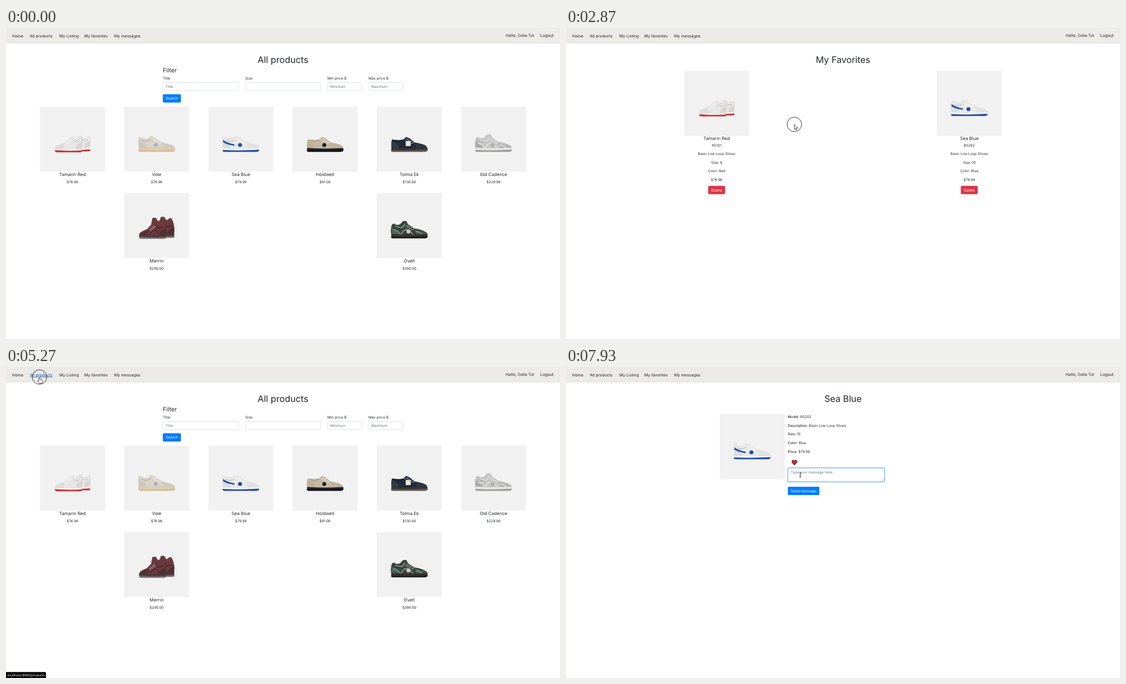
Write an HTML page that moves like this. It is 998 by 561 pixels and loops after 8000 ms.

```html
<!DOCTYPE html>
<html lang="en">
<head>
<meta charset="utf-8">
<title>Shoe shop</title>
<style>
html, body { margin: 0; height: 100%; overflow: hidden; background: #fff; }
svg { display: block; width: 100vw; height: 100vh; font-family: Inter, "Open Sans", sans-serif; }
text { fill: #212529; text-rendering: geometricPrecision; white-space: pre; }
</style>
</head>
<body>
<svg id="stage" viewBox="0 0 998 561" preserveAspectRatio="none"></svg>
<script>
const stage = document.getElementById('stage');

const text = (x, y, size, str, more = '') =>
  `<text x="${x}" y="${y}" font-size="${size}" ${more}>${str}</text>`;
const mid = (x, y, size, str, more = '') => text(x, y, size, str, 'text-anchor="middle" ' + more);
const box = (x, y, w, h, fill, more = '') =>
  `<rect x="${x}" y="${y}" width="${w}" height="${h}" fill="${fill}" ${more}/>`;
const path = (d, fill, more = '') => `<path d="${d}" fill="${fill}" ${more}/>`;
const button = (x, y, w, label, fill, size = 6.6) =>
  box(x, y, w, 15, fill, 'rx="1.8"') + mid(x + w / 2, y + 9.8, size, label, 'style="fill:#fff"');
const title = str => mid(499, 62.5, 16.2, str);

// Shoe outlines in a 117 x 117 tile, toe to the right.
const LOW = 'M26 57Q27 53.5 30 56Q38 60 44 57.5L47.5 53.5 54 55.5 66 63.5Q76 67 86 69.5Q91 71 91 77H27Q25 66 26 57Z';
const FLAT = 'M26.5 62Q27 58 30 59.5Q42 61 48 59L53 54.5 59 57 68 64.5Q80 66.5 87 69.5Q91.5 72 91 77H27Q25.5 70 26.5 62Z';
const RUNNER = 'M26 62Q27 54 31 55Q36 59 42 56L47 50.5 53 50 56 56 67 63.5Q80 65 88 70Q92 72 91 77H27Q24 70 26 62Z';
const HIGH = 'M26 62Q29 47 36 45.5L45 50 51 43.5 59 44 62 56 72 64Q82 67 88 70Q92 72 91 77H27Q25 68 26 62Z';

function shoe({ shape = LOW, upper, panel, sole, out, accent, mark, square, thick = 0 }) {
  const top = 74.5 - thick;
  return path(shape, upper, 'stroke="#0004" stroke-width=".4"') +
    path('M27 62Q34 66 38 68L41 77H27Q25.5 68 27 62Z', panel) +
    path('M67 65.5Q72 72 71 77H91Q91 72 86 70 76 68 70 66Z', panel, 'opacity=".7"') +
    path('M31 60.5Q40 65 47.5 59.5', 'none', 'stroke="#0004" stroke-width="1"') +
    path('M51 60l6-2m-3 4.5l6-2.5m-2.5 4.5l6-2.5m-2.5 4.5l6-2', 'none', 'stroke="#fff9" stroke-width="1.1"') +
    (accent ? path('M30 66Q38 66 43 75M44 74Q50 62 58 67L66 75M70 69Q78 70 82 75M33 60L46 62 51 55', 'none',
      `stroke="${accent}" stroke-width="2.2"`) : '') +
    path(`M26 ${top}Q60 ${top + 2} 91 ${top}Q92 77 91 80H27Q25.5 77 26 ${top}Z`, sole, 'stroke="#0002" stroke-width=".3"') +
    path('M25.5 78Q60 79.5 91.5 77.5Q91.5 81.5 86 81.5H29Q25.5 81.5 25.5 78Z', out) +
    (!mark ? '' : square ? box(52, 62, 9, 9, mark) : `<circle cx="57" cy="69" r="3.6" fill="${mark}"/>`);
}
const pair = o => [[109.5, -1, o], [94.5, .8, { ...o, mark: '' }]].map(([x, y, part]) =>
  `<g transform="translate(${x} ${y}) scale(-.74 1)">${shoe(part)}</g>`).join('');

const red = pair({ upper: '#e9e6e6', panel: '#d9d5d5', sole: '#f3efef', out: '#cc3433', mark: '#d8322c' });
const blue = shoe({ upper: '#ebeae8', panel: '#dddde0', sole: '#f4f4f4', out: '#25509e', mark: '#1c4fa8' }) +
  path('M26.5 60Q34 65.5 47 68V70.5Q33 68.5 26.5 64Z', '#1c4fa8');
const products = [
  ['Tamarin Red', '$76.96', red],
  ['Vole', '$76.96', shoe({ upper: '#d9d3c9', panel: '#cdc6ba', sole: '#dfcdae', out: '#d2bd99', mark: '#aeb0b6', thick: 1 })],
  ['Sea Blue', '$79.99', blue],
  ['Holdwell', '$91.00', shoe({ shape: FLAT, upper: '#c5b9a2', panel: '#bdb098', sole: '#22222a', out: '#111116', mark: '#1a1c2c' })],
  ['Tolma Ek', '$130.00', shoe({ shape: FLAT, upper: '#222b3a', panel: '#343b46', sole: '#3b3634', out: '#65564c', mark: '#e9e5d6', square: 1 })],
  ['Old Cadence', '$229.99', shoe({ shape: RUNNER, upper: '#c4c4c4', panel: '#a9aaab', sole: '#e6e4e0', out: '#9c9c9d', accent: '#dededd', mark: '#b0b0b0', thick: 1 })],
  ['Merrin', '$290.00', pair({ shape: HIGH, upper: '#6b3a3f', panel: '#51302f', sole: '#4a3a3c', out: '#77696c', accent: '#4a2c2f', mark: '#a59a98' })],
  ['Ovelt', '$390.00', shoe({ shape: RUNNER, upper: '#3a423f', panel: '#45665c', sole: '#39332f', out: '#1c1b1b', accent: '#7b9186', mark: '#cfcfc4', thick: 1 })]
];

const tile = (x, y, art) =>
  `<g transform="translate(${x} ${y})">${box(0, 0, 117, 117, '#f1f1f1')}${art}</g>`;
const card = (cx, y, name, art) => tile(cx - 58.5, y, art) + mid(cx, y + 124.6, 8.1, name);
const centre = col => 119.7 + 151.7 * col;

const field = (x, w, label, hint) =>
  text(x, 92.6, 6.4, label) +
  box(x, 98.5, w, 14.5, '#fff', 'rx="1.8" stroke="#ced4da" stroke-width=".7"') +
  text(x + 5, 108.2, 6.4, hint, 'style="fill:#6c757d"');

const allPage = title('All products') + text(282.5, 80, 10.7, 'Filter') +
  field(282.7, 136, 'Title:', 'Title') + field(431, 136, 'Size:', '') +
  field(579, 62.3, 'Min price $:', 'Minimum') + field(653, 62.3, 'Max price $:', 'Maximum') +
  button(282.5, 119.4, 32.5, 'Search', '#007bff') +
  products.map(([name, price, art], i) => {
    const cx = centre(i < 6 ? i : i === 6 ? 1 : 4), y = i < 6 ? 142 : 298;
    return card(cx, y, name, art) + mid(cx, y + 138, 6.3, price);
  }).join('');

const favorite = (cx, name, art, lines) => card(cx, 77.3, name, art) +
  lines.map((s, i) => mid(cx, 213.5 + 15.6 * i, 6.3, s)).join('') +
  button(cx - 15.2, 284.8, 30.4, 'Delete', '#dc3545', 6.5);
const favPage = title('My Favorites') +
  favorite(centre(1), 'Tamarin Red', red, ['RS101', 'Basic Low Loop Shoes', 'Size: 9', 'Color: Red', '$76.96']) +
  favorite(centre(4), 'Sea Blue', blue, ['BS202', 'Basic Low Loop Shoes', 'Size: 10', 'Color: Blue', '$79.99']);

const facts = [['Model', 'BS202'], ['Description', 'Basic Low Loop Shoes'], ['Size', '10'], ['Color', 'Blue'], ['Price', '$79.99']];
const detailPage = title('Sea Blue') + tile(277, 85, blue) +
  facts.map(([k, v], i) => text(399.6, 92.1 + 15.6 * i, 6.3, `<tspan font-weight="500">${k}</tspan>: ${v}`)).join('') +
  path('M0 4.7C-6.4 0-4.6-4-2.3-4-.8-4 0-2.6 0-2.6 0-2.6.8-4 2.3-4 4.6-4 6.4 0 0 4.7Z', '#fff',
    'id="heart" transform="translate(411.5 172)" stroke="#111" stroke-width="1"') +
  box(399.2, 181.7, 175, 25.6, 'none', 'id="glow" rx="2.4" stroke="#007bff" stroke-opacity=".35" stroke-width="1.7"') +
  box(400, 182.5, 173.4, 24, '#fff', 'id="area" rx="1.8" stroke="#ced4da" stroke-width=".8"') +
  path('M569 205.5l3.5-3.5m-1.5 3.5l1.5-1.5', 'none', 'stroke="#777" stroke-width=".5"') +
  text(404.8, 191.8, 6.4, 'Type your message here...', 'style="fill:#6c757d"') +
  button(399.7, 216, 56.6, 'Send message', '#007bff', 6.7);

const links = [[11, 'Home'], [43, 'All products'], [96, 'My Listing'], [141, 'My favorites'], [194.7, 'My messages']];
const nav = box(0, 0, 998, 28.3, '#eceae6') +
  links.map(([x, s], i) => text(x, 16.7, 7.25, s, i === 1 ? 'id="link"' : '')).join('') +
  text(952, 16.4, 7.25, 'Hello, Celia Tor', 'text-anchor="end"') +
  box(957.5, 3.6, 34, 20, 'none', 'rx="2" stroke="#f8f9fa" stroke-width=".8"') +
  mid(974.5, 16, 7.25, 'Logout');

const ink = 'stroke="#111" stroke-width=".7" stroke-linejoin="round"';
const cursors = {
  arrow: path('M0 0V9L2 7.2 3.5 10.3 5 9.6 3.6 6.6H6.3Z', '#fff', ink),
  hand: path('M-1 1Q0-.6 1 1V4.5L4.6 5.4Q5.8 5.8 5.5 7.5L4.7 11.5H-.8L-3.6 7.6Q-3.2 6-1 7.6Z', '#fff', ink),
  beam: path('M-1.6-4.2Q0-4.2 0-3.4 0-4.2 1.6-4.2M0-3.4V3.4M-1.6 4.2Q0 4.2 0 3.4 0 4.2 1.6 4.2', 'none', 'stroke="#111" stroke-width=".9"')
};

const group = (id, body) => `<g id="${id}">${body}</g>`;
stage.innerHTML = nav + group('all', allPage) + group('fav', favPage) + group('detail', detailPage) +
  group('status', path('', '#000', 'id="bubble"') +
    text(2.4, 557.9, 6, '', 'id="url" style="fill:#fff;font-family:Open Sans,sans-serif"')) +
  group('pointer', `<circle id="ring" r="13.1" fill="none" stroke="#222" stroke-width=".9"/>` +
    Object.keys(cursors).map(k => group(k, cursors[k])).join(''));

const el = {};
for (const node of stage.querySelectorAll('[id]')) el[node.id] = node;
const show = (id, on) => el[id].setAttribute('display', on ? 'inline' : 'none');

// time, x, y of the pointer
const route = [
  [130, 500, 300], [1130, 439.8, 203], [1600, 439.8, 203], [1800, 432, 201], [1870, 432, 201],
  [2200, 411.3, 173.8], [3470, 411.3, 173.8], [4730, 62.7, 24.7], [4870, 60.3, 18.1], [5330, 60.3, 18.1],
  [6130, 405, 187.5], [6800, 405, 187.5], [6930, 422, 194.8]
];
const pages = [[0, 'all'], [1400, 'detail'], [2740, 'fav'], [5070, 'all'], [6530, 'detail']];
const clicks = [[1200, 1470], [2670, 2940], [5000, 5330], [6400, 6670], [7130, 7330]];
// shown from, fade start, fade end
const hints = [[1000, 1530, 1730], [4870, 6670, 6870]];

const clamp = v => Math.max(0, Math.min(1, v));

function pointerAt(t) {
  const i = route.findIndex(p => p[0] > t);
  if (i < 1) return route.at(i ? -1 : 0).slice(1);
  const [a, b] = [route[i - 1], route[i]];
  const u = (t - a[0]) / (b[0] - a[0]), e = u * u * (3 - 2 * u);
  return [a[1] + (b[1] - a[1]) * e, a[2] + (b[2] - a[2]) * e];
}

function draw(now) {
  const t = now % 8000;
  const page = pages.findLast(p => p[0] <= t)[1];
  for (const id of ['all', 'fav', 'detail']) show(id, id === page);

  const [x, y] = pointerAt(t);
  const inside = (l, top, r, b) => x > l && x < r && y > top && y < b;
  const onLink = inside(43, 9, 85, 21);
  const onHeart = page === 'detail' && inside(404, 167, 419, 180);
  const onArea = page === 'detail' && inside(400, 182, 574, 207);
  const kind = onLink || onHeart ? 'hand' : onArea ? 'beam' : 'arrow';
  for (const id in cursors) show(id, id === kind);
  show('pointer', t >= 130);
  show('ring', clicks.some(([a, b]) => t >= a && t < b));
  el.pointer.setAttribute('transform', `translate(${x} ${y})`);

  el.link.style.fill = onLink ? '#0056b3' : '';
  el.link.style.textDecoration = onLink ? 'underline' : '';
  el.heart.setAttribute('fill', t > 2740 ? '#ee1c25' : '#fff');

  const focus = clamp((t - 7130) / 150);
  el.glow.setAttribute('opacity', focus);
  el.area.setAttribute('stroke', focus > .5 ? '#80bdff' : '#ced4da');

  const hint = hints.find(h => t >= h[0] && t < h[2]);
  show('status', hint);
  if (hint) {
    const product = t < 4000 || t > 5800;
    const w = product ? 78 : 72;
    el.status.setAttribute('opacity', clamp((hint[2] - t) / (hint[2] - hint[1])));
    el.bubble.setAttribute('d', `M0 550.3H${w - 1.5}Q${w} 550.3 ${w} 551.8V561H0Z`);
    el.url.textContent = 'localhost:8080/products' + (product ? '/2' : '');
  }
}

function loop(now) {
  draw(now);
  requestAnimationFrame(loop);
}
draw(0);
requestAnimationFrame(loop);
</script>
</body>
</html>
```
